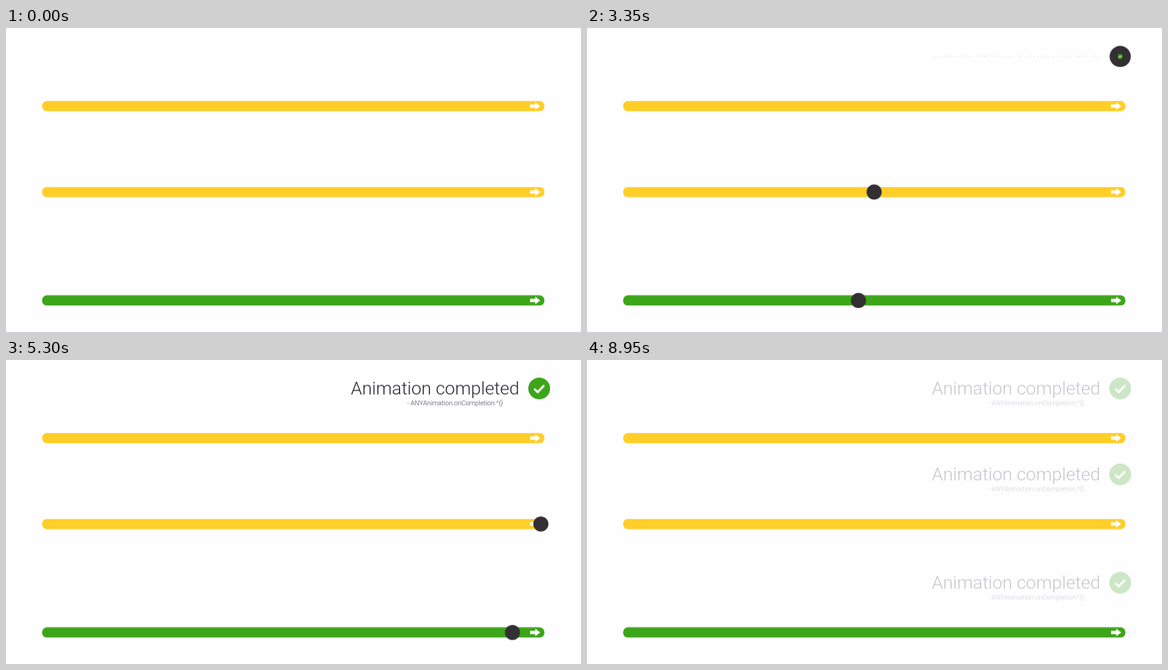
An HTML page for the animation above (9000 ms loop, 960 by 507 pixels).

```html
<!DOCTYPE html>
<html lang="en">
<head>
<meta charset="utf-8">
<title>Animation completed</title>
<style>
  html, body { margin: 0; height: 100%; overflow: hidden; background: #fefdff; }
  svg { display: block; width: 100vw; height: 100vh; }
  .ball, .disc { fill: #333033; }
  .check { fill: none; stroke: #fff; stroke-width: 3.4; }
  text { font-family: Roboto, "Open Sans", sans-serif; font-weight: 300; text-anchor: end; }
  .title { font-size: 30px; fill: #29272b; }
  .note { font-size: 11px; fill: #444146; }
</style>
</head>
<body>
<svg id="stage" viewBox="0 0 960 507"></svg>
<script>
const LOOP = 9000, START = 65, END = 893;
const YELLOW = '#ffce28', GREEN = '#3da519';
const SURGE = 'cubic-bezier(1, 0, .604, 1)';

// path: [time, x, easing towards the next point]; done: moment the badge turns green
const rows = [
  { bar: 130.3, badge: 47.5, color: YELLOW, done: 3309,
    path: [[350, START, SURGE], [2534, 924, 'ease-in-out'], [2780, END]] },
  { bar: 273.5, badge: 190.7, color: YELLOW, done: 5870,
    path: [[1300, START, SURGE], [4150, 932, 'ease-in-out'], [4500, END]] },
  { bar: 454.4, badge: 371.5, color: GREEN, done: 6023,
    path: [[900, START, 'ease-in'], [1400, 102], [2250, 252], [3350, 453], [3800, 539],
           [4500, 681], [4750, 732], [5400, 866, 'ease-out'], [5600, END]] },
];

const rowMarkup = ({ bar, badge, color }) => `
  <g transform="translate(0 ${bar})">
    <rect x="60.3" y="-8.5" width="838.6" height="17" rx="8" fill="${color}"/>
    <path d="M875-2.8h8.6v-3.5l8.4 6.3-8.4 6.3v-3.5H875z" fill="#fff"/>
    <g class="mover"><circle class="ball" r="12.6"/></g>
  </g>
  <g class="result" transform="translate(0 ${badge})">
    <g class="label">
      <text class="title" x="857" y="9.5">Animation completed</text>
      <text class="note" x="830" y="27.5">- ANYAnimation.onCompletion:^{}</text>
    </g>
    <g transform="translate(890.2 0)">
      <circle class="disc" r="17.7"/>
      <g class="tick">
        <circle r="18" fill="${GREEN}"/>
        <path class="check" d="M-8.3 .6L-2.6 6 8.3-5.2"/>
      </g>
    </g>
  </g>`;

const stage = document.getElementById('stage');
stage.innerHTML = rows.map(rowMarkup).join('');

// Plays [time, style, easing] frames over the loop, holding the first and last ones.
function play(node, frames) {
  const all = [[0, frames[0][1]], ...frames, [LOOP, frames.at(-1)[1]]];
  node.animate(
    all.map(([time, style, easing = 'linear']) => ({ ...style, offset: time / LOOP, easing })),
    { duration: LOOP, iterations: Infinity });
}

const moveTo = x => ({ transform: `translateX(${x}px)` });
const scale = s => ({ transform: `scale(${s})` });
const unfold = (s, opacity) => ({ transform: `scaleY(${s})`, opacity });

rows.forEach(({ path, done }, i) => {
  const part = name => stage.querySelectorAll(name)[i];

  play(part('.mover'), path.map(([time, x, easing]) => [time, moveTo(x), easing]));
  play(part('.ball'), [
    [20, scale(0), 'ease-out'], [200, scale(1.17), 'ease-in-out'], [340, scale(1)],
    [done - 330, scale(1), 'ease-in'], [done - 230, scale(0)],
  ]);
  play(part('.disc'), [
    [done - 273, scale(0), 'ease-out'], [done - 80, scale(1)],
  ]);
  play(part('.tick'), [
    [done, scale(0)], [done + 200, scale(1.09), 'ease-in-out'], [done + 330, scale(1)],
  ]);
  play(part('.label'), [
    [done, unfold(0.06, 0)], [done + 77, unfold(0.12, 0.17)],
    [done + 230, unfold(0.2, 0.28), 'ease-in-out'], [done + 600, unfold(1, 1)],
  ]);
  play(part('.result'), [
    [8700, { opacity: 1 }], [8950, { opacity: 0.26 }], [8999, { opacity: 0 }],
  ].flatMap((frame, k) => k ? [frame] : [[1, { opacity: 1 }], frame]));
});
</script>
</body>
</html>
```
